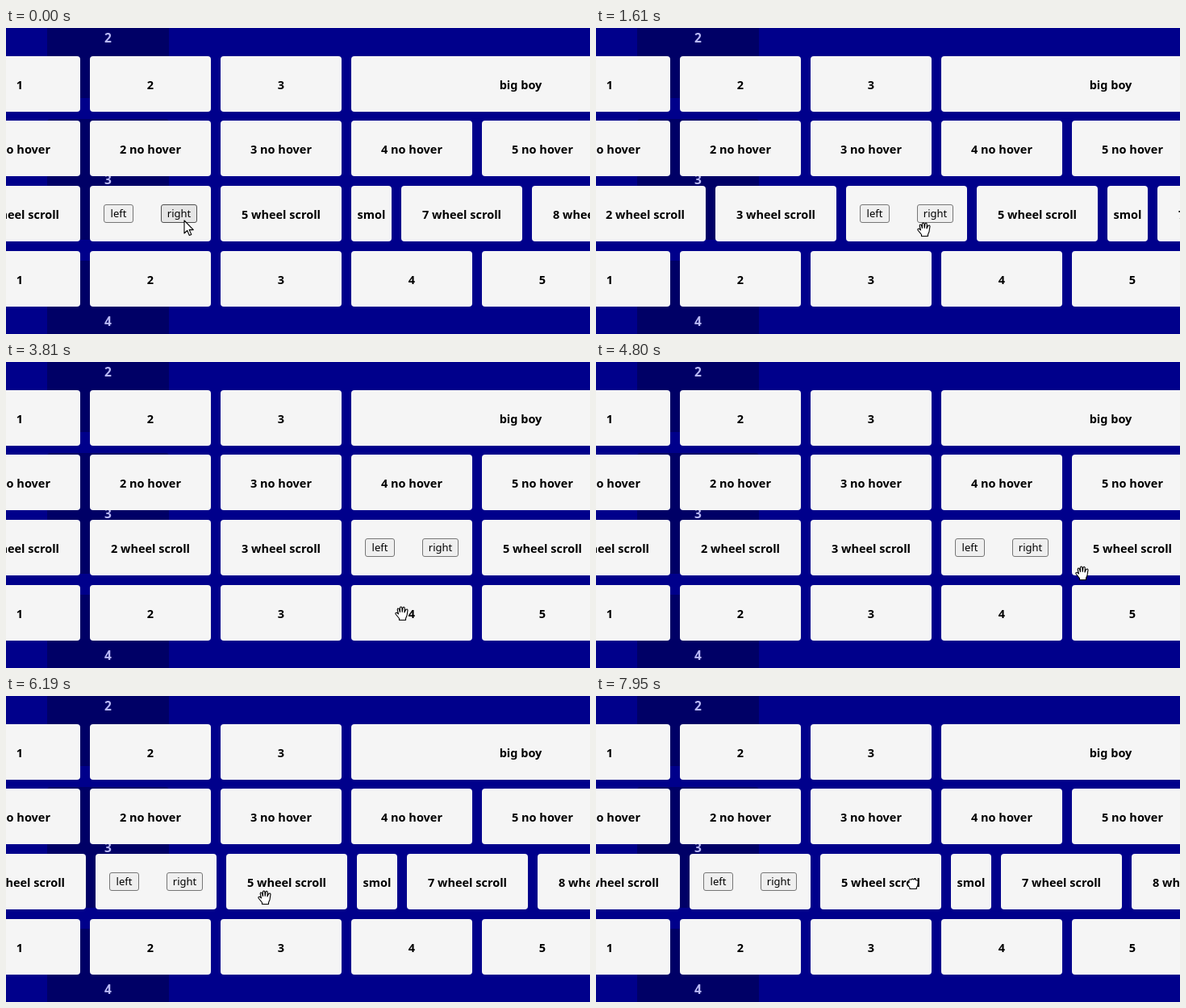
Recreate the animation shown at these times as an HTML page. Size 724 by 380 pixels, loop 8000 ms.

```html
<!DOCTYPE html>
<html lang="en">
<meta charset="utf-8">
<title>Carousel rows</title>
<style>
  html, body { margin: 0; width: 100%; height: 100%; overflow: hidden; background: #00008b; }
  body { position: relative; font: 700 14.5px "Noto Sans", sans-serif; color: #000; cursor: default; }
  .slide, .row, .card, button, svg { position: absolute; box-sizing: border-box; }
  .slide {
    left: 51px; width: 151px; height: 150px; border-radius: 4px; background: #006;
    color: #b9b9f6; font-size: 15.5px; line-height: 150px; text-align: center;
  }
  .row { left: 0; width: 100%; height: 69px; }
  .card {
    top: 0; height: 100%; padding-top: 1px; border-radius: 4px; background: #f5f5f5;
    line-height: 69px; text-align: center; white-space: nowrap;
  }
  button {
    top: 23px; height: 23px; padding: 0; border: 1px solid #767676; border-radius: 3px;
    background: #efefef; color: #000; font: 400 13px/21px "Noto Sans", sans-serif;
  }
  button.hover { background: #e5e5e5; border-color: #4f4f4f; }
  svg { left: 0; top: 0; width: 100%; height: 100%; pointer-events: none; }
  path { fill: #fff; stroke: #000; stroke-width: 1.1; stroke-linejoin: round; }
</style>
<body>
<script>
const START = -58, GAP = 12, CARD = 150;
const BUTTON_CARD = START + 3 * (CARD + GAP);
const LOOP = 8000;

const shapes = {
  arrow: "M0 0V16L3.7 12.5L6.3 18.5L8.8 17.4L6.2 11.6H11.3Z",
  open: "M-3.5 8.5V6.5L-8 1Q-8.5 -1 -6.5 -.8L-4.5 1L-5.8 -4.5Q-5.5 -6.8 -3.8 -5.5L-2.5 -1.5" +
    "L-2.6 -7Q-1.3 -9 -.2 -7L.2 -1.5L1 -7Q2.3 -8.7 3.3 -6.5L3 -1L4.6 -4.5Q6.5 -5.8 7 -3.8L6 3L4.5 6.5V8.5Z",
  closed: "M-4 6.5V5L-6.5 1.5Q-7 -1.5 -4.8 -1.5L-5 -4Q-3.8 -6 -2.2 -4.8Q-.8 -6.8 .8 -5" +
    "Q2.5 -6.3 3.8 -4.2Q6.3 -4.8 6.3 -2L5.8 2.5L4.3 5V6.5Z"
};

// time, pointer x, pointer y, left edge of the button card, pointer shape
const keys = [
  [0, 221, 239, 104, "arrow"],
  [180, 221, 239, 104, "arrow"],
  [300, 220, 235, 104, "arrow"],
  [470, 220, 235, 104, "closed"],
  [1250, 398, 254, 282, "closed"],
  [1430, 414, 252, 298, "open"],
  [1610, 407, 250, 310, "open"],
  [1900, 430, 280, 275, "open"],
  [2150, 456, 262, 266, "closed"],
  [2460, 545, 246, 355, "closed"],
  [2760, 590, 255, 400, "open"],
  [2940, 585, 283, 418, "open"],
  [3400, 525, 300, 428, "open"],
  [3810, 491, 312, 428, "open"],
  [4240, 545, 292, 428, "open"],
  [4480, 545, 292, 428, "open"],
  [4980, 627, 250, 428, "closed"],
  [5490, 476, 251, 277, "closed"],
  [5800, 350, 280, 151, "open"],
  [6070, 322, 255, 118, "open"],
  [6400, 320, 244, 104, "open"],
  [6820, 360, 240, 104, "open"],
  [7000, 381, 236, 104, "open"],
  [7180, 381, 236, 104, "closed"],
  [7950, 393, 233, 116, "closed"],
  [LOOP, 394, 233, 117, "closed"]
];

function add(parent, tag, className, text = "") {
  const el = document.createElement(tag);
  el.className = className;
  el.textContent = text;
  parent.append(el);
  return el;
}

function addRow(top, labels, widths = {}) {
  const row = add(document.body, "div", "row");
  row.style.top = top + "px";
  let x = START;
  for (const label of labels) {
    const width = widths[label] || CARD;
    const card = add(row, "div", "card", label);
    card.style.left = x + "px";
    card.style.width = width + "px";
    x += width + GAP;
  }
  return row;
}

function addButton(card, label, left, width) {
  const button = add(card, "button", "", label);
  button.style.left = left + "px";
  button.style.width = width + "px";
  return button;
}

const numbered = (count, suffix) => Array.from({ length: count }, (_, i) => i + 1 + suffix);

[2, 3, 4].forEach((n, i) => {
  add(document.body, "div", "slide", n).style.top = -63 + 176 * i + "px";
});

addRow(35, ["1", "2", "3", "big boy"], { "big boy": 420 });
addRow(115, numbered(5, " no hover"));
const wheelLabels = numbered(8, " wheel scroll");
wheelLabels[3] = "";
wheelLabels[5] = "smol";
const wheelRow = addRow(196, wheelLabels, { smol: 50 });
addRow(277, numbered(5, ""));

const buttonCard = wheelRow.children[3];
addButton(buttonCard, "left", 17, 37);
const right = addButton(buttonCard, "right", 88, 45);

document.body.insertAdjacentHTML("beforeend", "<svg><path/></svg>");
const pointer = document.querySelector("path");

// Slope at key i, flat at turning points so that nothing overshoots
function slope(i, c) {
  const a = keys[i - 1], b = keys[i], d = keys[i + 1];
  if (!a || !d) return 0;
  const before = (b[c] - a[c]) / (b[0] - a[0]);
  const after = (d[c] - b[c]) / (d[0] - b[0]);
  return before * after > 0 ? 2 * before * after / (before + after) : 0;
}

function valueAt(t, i, c) {
  const a = keys[i], b = keys[i + 1], span = b[0] - a[0];
  const u = (t - a[0]) / span, v = 1 - u;
  return a[c] * v * v * (1 + 2 * u) + b[c] * u * u * (3 - 2 * u) +
    span * u * v * (v * slope(i, c) - u * slope(i + 1, c));
}

function draw(now) {
  const t = now % LOOP;
  const i = keys.findIndex(k => k[0] > t) - 1;
  const [x, y, card] = [1, 2, 3].map(c => Math.round(valueAt(t, i, c)));
  const shape = keys[i][4];
  wheelRow.style.transform = `translateX(${card - BUTTON_CARD}px)`;
  right.className = shape === "arrow" ? "hover" : "";
  pointer.setAttribute("d", shapes[shape]);
  pointer.setAttribute("transform", `translate(${x} ${y})`);
}

const start = performance.now();
function tick() {
  draw(performance.now() - start);
  requestAnimationFrame(tick);
}
tick();
</script>
</body>
</html>
```
